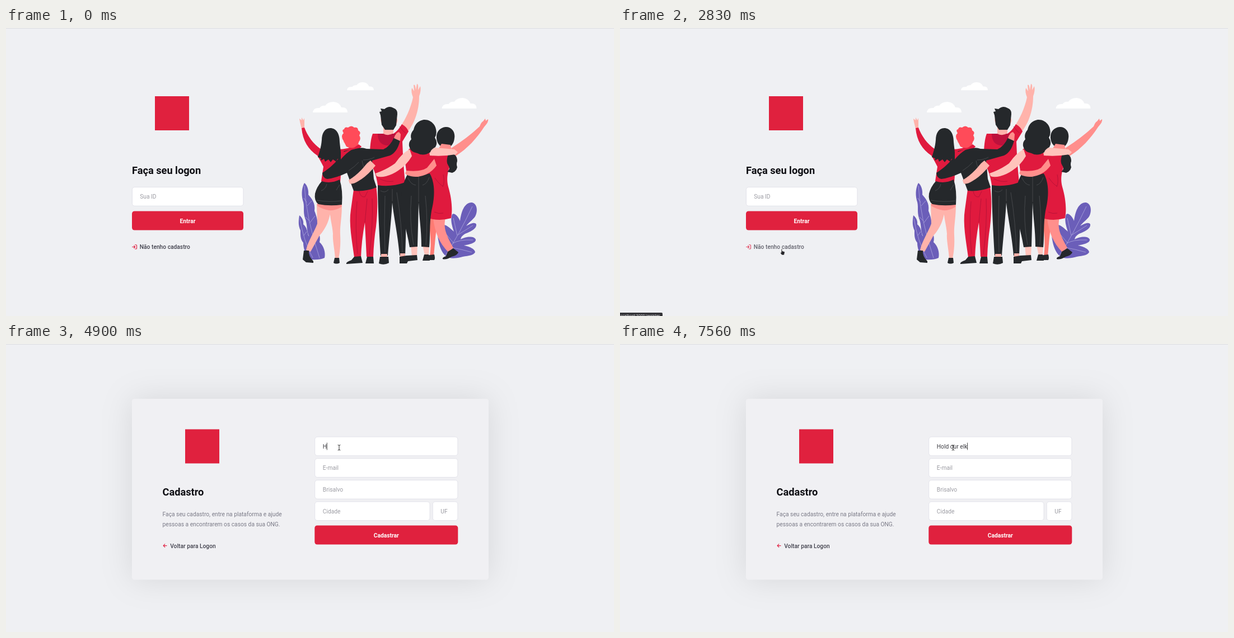
An HTML page that plays this animation: 1086 by 515 pixels, repeating every 8 s.

```html
<!DOCTYPE html>
<html lang="pt-BR">
<head>
<meta charset="utf-8">
<title>Logon e cadastro</title>
<style>
  html, body { margin: 0; width: 100%; height: 100%; overflow: hidden; background: #eff0f3; }
  svg { display: block; width: 1086px; height: 515px; font: 10.24px Roboto, sans-serif; }
  text { white-space: pre; }
  .input { fill: #fff; stroke: #dedee6; stroke-width: .8; }
  .red { fill: #e01a3e; }
  .button { fill: #e0213e; }
  .dark { fill: #25282b; }
  .light { fill: #ffc3bb; }
  .skin { fill: #ffb3ab; }
  .pink { fill: #ff8f8c; }
  .purple { fill: #6b5eb9; }
  .wine { fill: #bd113c; }
  .seam { fill: none; stroke: #5b5d60; stroke-width: .6; }
  .fold { fill: none; stroke: #a90f35; stroke-width: .7; }
  .vein { fill: none; stroke: #b7b0e2; stroke-width: .7; }
  .icon { fill: none; stroke: #e02041; stroke-width: 1.1; stroke-linecap: round; stroke-linejoin: round; }
  .title { font-size: 18.2px; font-weight: 700; fill: #0d0d12; }
  .hint { fill: #9c9ca3; }
  .link { font-weight: 500; fill: #41414d; }
  .label { font-weight: 700; fill: #fff; text-anchor: middle; }
  .body { fill: #7a7a87; }
  .card { fill: #f0f0f3; filter: drop-shadow(0 0 28px rgba(0, 0, 0, .1)); }
  .cursor { fill: #26262a; stroke: #fff; stroke-width: .7; stroke-linejoin: round; }
</style>
</head>
<body>
<svg viewBox="0 0 1086 515">
  <rect width="1086" height="515" fill="#eff0f3"/>
  <rect width="1086" height="1" fill="#dcdde0"/>

  <g id="login">
    <rect class="button" x="266" y="122" width="61" height="61"/>
    <text class="title" x="225" y="261">Faça seu logon</text>
    <rect class="input" x="225.4" y="284.6" width="198.5" height="33.6" rx="4.5"/>
    <text class="hint" x="239.2" y="305.2">Sua ID</text>
    <rect class="button" x="225" y="327.5" width="199" height="34" rx="4.5"/>
    <text class="label" x="324.5" y="348.6">Entrar</text>
    <g id="signupLink">
      <path class="icon" d="M230.5 387.8h2q1 0 1 1v5.2q0 1-1 1h-2M228.5 389.3l2.2 2.2-2.2 2.2M225.6 391.5h5"/>
      <text class="link" x="238.8" y="395.2">Não tenho cadastro</text>
    </g>

    <!-- clouds -->
    <g fill="#fff">
      <path id="cloud" d="M548 151Q549 142 560 143Q564 138 570 139Q575 132 585 132Q596 133 599 142Q610 141 610 151Z"/>
      <use href="#cloud" transform="translate(230.5 -7)"/>
      <use href="#cloud" transform="translate(184.3 -.6) scale(.775 .74)"/>
    </g>

    <!-- plants -->
    <path class="purple" d="M533 277C538 281 541 290 540 298C546 305 553 313 551 327C554 335 558 345 556 357C557 365 563 372 560 383C568 390 571 402 569 411Q560 415 546 414C541 400 543 388 541 372C536 360 539 352 534 340C530 328 534 318 530 308C527 295 529 284 533 277Z"/>
    <path class="purple" d="M524 335C529 339 532 345 531 351C538 357 538 364 540 371C548 380 553 395 551 414L543 413C535 405 531 395 531 384C525 377 526 368 526 362C521 352 523 342 524 335Z"/>
    <path class="vein" d="M533 282Q536 340 560 411M537 312l-5-8M538 318l8-9M543 348l9-12M542 345l-7-7M550 378l7-14M525 341Q531 380 548 411M532 371l5-7"/>
    <path class="purple" d="M786 408C778 402 774 390 772 378C770 366 775 353 782 352C789 353 794 359 800 364C797 355 793 343 797 333C801 330 808 337 811 345C813 330 818 312 832 312C842 314 843 328 838 337C834 343 826 348 822 354C828 350 838 346 840 351C841 359 830 364 820 368Q813 372 812 378C820 373 836 371 839 378C840 385 826 387 818 389C826 390 838 395 838 401C834 408 822 407 812 410C802 412 792 413 786 408Z"/>
    <path class="vein" d="M784 408Q808 372 833 319M806 371L799 340M807 370L834 353M798 385Q810 378 834 379M793 392Q815 396 832 401M799 384L779 360"/>

    <!-- woman on the far right -->
    <path fill="#ff7b73" d="M755 340H771L767 375L764 408H757C761 380 756 360 755 340Z"/>
    <path class="pink" d="M763 340H785C781 356 785 368 799 393L790 401C774 384 766 366 763 340Z"/>
    <path class="dark" d="M756 406L765 405Q767 412 765 415H745Q744 411 756 406ZM789 400L799 394L808 401Q807 406 796 409Q786 415 780 413Q779 410 786 408Z"/>
    <path class="pink" d="M795 215Q825 196 846 176Q849 168 852 167L856 162L857 166L861 163Q863 167 854 177C841 197 824 216 803 229Z"/>
    <path class="red" d="M758 226Q780 218 803 228C794 242 784 262 790 284C796 304 798 325 795 340Q774 346 754 340L758 290Z"/>
    <path class="fold" d="M766 268q8 12 15 15M781 262q3 14-1 22M765 329q8 4 16 2"/>
    <path class="dark" d="M785 177C795 176 803 185 801 197C800 208 793 216 783 215Q770 210 769 197C768 185 776 178 785 177ZM790 225Q806 223 806 238Q804 244 806 249Q804 257 797 259L788 257Q795 252 790 246Q785 240 790 225Z"/>
    <path class="pink" d="M778 207L794 209L796 219L770 220Z"/>

    <!-- tall man -->
    <path class="dark" d="M664 281L711 276C715 315 715 365 713 407H703C700 370 692 335 690 312C688 345 684 380 682 407H669C667 370 664 320 664 281Z"/>
    <path class="seam" d="M669 291q8 5 14-2M690 288v22M677 300Q675 350 677 401M698 294Q707 350 708 401"/>
    <path class="skin" d="M670 404H681V411H670ZM704 403H713V411H704Z"/>
    <path class="dark" d="M668 409H683L684 420Q675 425 666 421Z"/>
    <path class="skin" d="M704 177C714 163 723 143 727 124Q723 114 725 107L729 113L728 102Q731 99 732 111L734 100Q737 99 736 111L740 104Q742 111 738 122C738 148 729 172 717 186Z"/>
    <path class="skin" d="M652 228L667 237C657 248 645 264 629 274Q619 280 614 278L612 272C626 263 640 248 652 228Z"/>
    <path class="red" d="M655 189H692Q701 183 707 172Q716 177 719 185L708 203Q709 240 713 276Q687 285 664 281Q660 255 650 240Q649 205 655 189Z"/>
    <path class="wine" d="M664 189H699C701 204 693 211 682 210C670 210 664 202 664 189Z"/>
    <path class="fold" d="M703 176q6 9 11 12M668 270q12 6 24 4"/>
    <path class="skin" d="M674 178H692V188Q683 194 674 189ZM671 160q-4 4 1 12ZM697 160q5 4 0 12Z"/>
    <path class="dark" d="M671 173L669 156L667 150L671 149L669 144L676 145Q684 138 692 143Q700 146 699 154L697 174L692 182H677Z"/>

    <!-- woman on the far left -->
    <path class="skin" d="M528 180L525 168L524 162L528 165V160L531 165L533 161V178ZM555 314L580 319C580 340 572 358 560 371L544 400L536 397C540 380 550 366 556 350ZM578 319L600 315C600 340 596 355 597 370C598 390 596 402 594 413H588C587 395 583 380 584 368C583 352 578 340 578 319Z"/>
    <path class="pink" d="M556 314H600L599 320Q588 327 577 326Q565 324 556 318Z"/>
    <path class="dark" d="M532 398L541 398Q540 408 549 417V420L536 419L530 414ZM587 411H595L596 420Q590 423 585 420Z"/>
    <path class="red" d="M528 179L533 178C538 192 549 208 563 217H592Q612 217 628 208L635 212Q620 230 600 238L597 276Q579 281 563 274L567 248Q561 236 556 228C540 217 530 202 528 179Z"/>
    <path class="dark" d="M564 274Q580 279 596 271Q602 290 600 316Q577 319 558 315Q550 309 552 296Q555 284 564 274Z"/>
    <path class="seam" d="M555 308q22 4 44 1M573 279q-2 9-10 12M596 280l-6 10"/>
    <path class="dark" d="M579 179C569 179 564 189 564 200C563 214 559 224 557 231L563 233L562 237L568 234L570 239L576 235L580 240L584 235L590 239L592 234L597 235C600 230 597 216 596 204C596 189 590 179 579 179Z"/>

    <!-- red-haired friend -->
    <path class="red" d="M621 289L661 283C665 305 663 340 661 355Q657 380 656 409H644L641 348Q635 380 634 410H622C618 380 612 350 616 325Z"/>
    <path class="fold" d="M631 292q2 11 10 10l5-10M645 305l-4 43M627 310q-4 45 1 94M654 305q2 45-5 100"/>
    <path class="dark" d="M622 409L634 408L637 420L608 422Q606 419 617 415ZM645 409H656L657 421H642Z"/>
    <path class="dark" d="M604 220Q616 217 630 215Q636 213 644 216L674 217Q686 212 693 196L704 201Q699 222 686 228L654 237L657 270L662 285Q642 293 621 291L609 259Q590 268 574 270Q565 268 565 259Q587 246 604 220Z"/>
    <path class="seam" d="M612 255Q623 248 630 240M638 236q12 0 20-5M636 237q2 14 9 20"/>
    <path class="pink" d="M693 197Q696 187 702 186L705 190L704 202Z"/>
    <path fill="#ffb3ab" d="M602 203L611 211L629 211L628 202Z"/>
    <path fill="#ff4b59" d="M603 202Q597 193 603 188Q599 182 604 181Q605 176 611 178Q617 173 622 178Q629 177 629 183Q635 186 631 192Q635 198 630 204L628 212Q618 217 608 212Z"/>
    <path class="red" d="M598 223Q618 218 630 208L635 212Q625 216 617 218Q607 224 598 235Z"/>
    <path class="skin" d="M612 272Q626 264 639 249Q646 240 651 237L660 246Q645 265 629 274Q619 280 614 278Z"/>

    <!-- woman with wavy hair -->
    <path class="light" d="M723 388H735L734 409H725ZM744 388H756L755 407H748Z"/>
    <path class="dark" d="M703 409L715 407L734 406L735 415L718 417L716 421H703ZM747 405H755L757 416H744Z"/>
    <path class="red" d="M720 216H758Q766 225 766 238L757 263H716L712 234Z"/>
    <path class="dark" d="M717 262Q738 266 757 260C767 278 766 303 760 327C756 350 758 375 756 392L742 391C742 360 738 340 737 312Q736 355 735 391L721 392C716 360 707 340 706 312C705 291 710 275 717 262Z"/>
    <path class="seam" d="M718 268q5 12 14 13M737 266v45M756 267q-4 12-12 14M724 300Q720 345 728 388M749 300Q754 345 750 388"/>
    <path class="light" d="M721 217L725 229Q713 250 690 261Q672 269 662 265L660 260Q680 253 695 242Q708 223 721 217Z"/>
    <path class="pink" d="M765 234L769 246Q757 263 736 266Q718 266 713 260L715 255Q740 258 752 250Z"/>
    <path class="light" d="M755 213Q778 215 801 217L807 222L803 226Q780 230 757 228Z"/>
    <path class="dark" d="M746 164C757 163 766 171 768 181Q770 190 766 196Q772 205 767 213Q759 217 758 222Q746 230 735 224Q722 222 720 211Q719 204 724 199Q721 190 728 182Q731 167 746 164Z"/>
  </g>

  <g id="signup">
    <rect class="card" x="225" y="98" width="637" height="323.5" rx="4.5"/>
    <rect class="button" x="320" y="152.5" width="61" height="61"/>
    <text class="title" x="279.6" y="271.3">Cadastro</text>
    <text class="body" x="279.6" y="307.6">Faça seu cadastro, entre na plataforma e ajude</text>
    <text class="body" x="279.6" y="325.8">pessoas a encontrarem os casos da sua ONG.</text>
    <path class="icon" d="M287 360.6h-6M283.8 357.8l-2.8 2.8 2.8 2.8"/>
    <text class="link" x="293.2" y="364.6">Voltar para Logon</text>
    <g id="fields"></g>
    <path id="caret" stroke="#222" stroke-width=".8" d="M0 176.5v13"/>
    <rect class="button" x="551.3" y="324.5" width="256" height="34" rx="4.5"/>
    <text class="label" x="679.3" y="345.6">Cadastrar</text>
  </g>

  <g id="status">
    <path d="M0 509H74q2 0 2 2V515H0Z" fill="#343438"/>
    <text x="-1.5" y="516.8" font-size="7" fill="#d5d5d8">localhost:3000/register</text>
  </g>

  <g id="pointers">
    <path id="arrow" class="cursor" d="M0 0V10L2.3 8L4 11.6L5.8 10.8L4.2 7.3H7Z"/>
    <path id="hand" class="cursor" d="M2 .8Q3 -.2 3.8 .8V4.2L7.4 5.2Q8.5 5.8 8.2 7.5L7.2 11.5H3L.2 7.6Q.2 6.2 2 7Z"/>
    <path id="beam" fill="none" stroke="#333" stroke-width="1" d="M-2.3 -4.5Q0 -4.5 0 -3Q0 -4.5 2.3 -4.5M0 -3V4M-2.3 5Q0 5 0 3.5Q0 5 2.3 5"/>
  </g>
</svg>
<script>
const LOOP = 8000;
const NAME = 'Hold our elk';
const NAME_HINT = 'Nome da ONG';
const $ = id => document.getElementById(id);

const field = (label, x, y, width) => `
  <rect class="input" x="${x}" y="${y}" width="${width}" height="33.6" rx="4.5"/>
  <text class="hint" x="${x + 14.1}" y="${y + 20.5}">${label}</text>`;

$('fields').innerHTML =
  [NAME_HINT, 'E-mail', 'Brisalvo'].map((label, i) => field(label, 551.7, 166.1 + i * 38.65, 255.2)).join('') +
  field('Cidade', 551.7, 282, 205.3) + field('UF', 762.2, 282, 44.7);
const nameText = $('fields').querySelector('text');

// [time, pointer shape, x, y]
const moves = [
  [0, null, 0, 0],
  [1760, 'arrow', 761, 404],
  [2160, 'arrow', 311, 414],
  [2500, 'arrow', 288, 394],
  [2830, 'hand', 286, 394.5],
  [3160, 'arrow', 304.5, 387],
  [3500, 'arrow', 470, 280],
  [3830, 'beam', 580, 196],
  [4100, 'beam', 595, 185]
];
// [time, typed characters]
const typing = [[0, 0], [4900, 1], [5300, 2], [5700, 3], [6030, 5], [6430, 6], [6760, 9], [7160, 10], [7560, 12]];

const stepAt = (steps, time) => steps.filter(step => step[0] <= time).pop();
const show = (id, visible) => { $(id).style.display = visible ? '' : 'none'; };

function render(time) {
  const onSignup = time >= 3160;
  const hovering = time >= 2830 && !onSignup;
  show('login', !onSignup);
  show('signup', onSignup);
  show('status', hovering);
  $('signupLink').style.opacity = hovering ? .8 : 1;

  const [, shape, x, y] = stepAt(moves, time);
  for (const id of ['arrow', 'hand', 'beam']) show(id, id === shape);
  $('pointers').setAttribute('transform', `translate(${x} ${y})`);

  const count = stepAt(typing, time)[1];
  nameText.textContent = count ? NAME.slice(0, count) : NAME_HINT;
  nameText.style.fill = count ? '#3c3c42' : '';
  show('caret', count > 0);
  if (count) $('caret').setAttribute('transform', `translate(${566 + nameText.getComputedTextLength()} 0)`);
}

const start = performance.now();
function tick() {
  render((performance.now() - start) % LOOP);
  requestAnimationFrame(tick);
}
tick();
</script>
</body>
</html>
```
